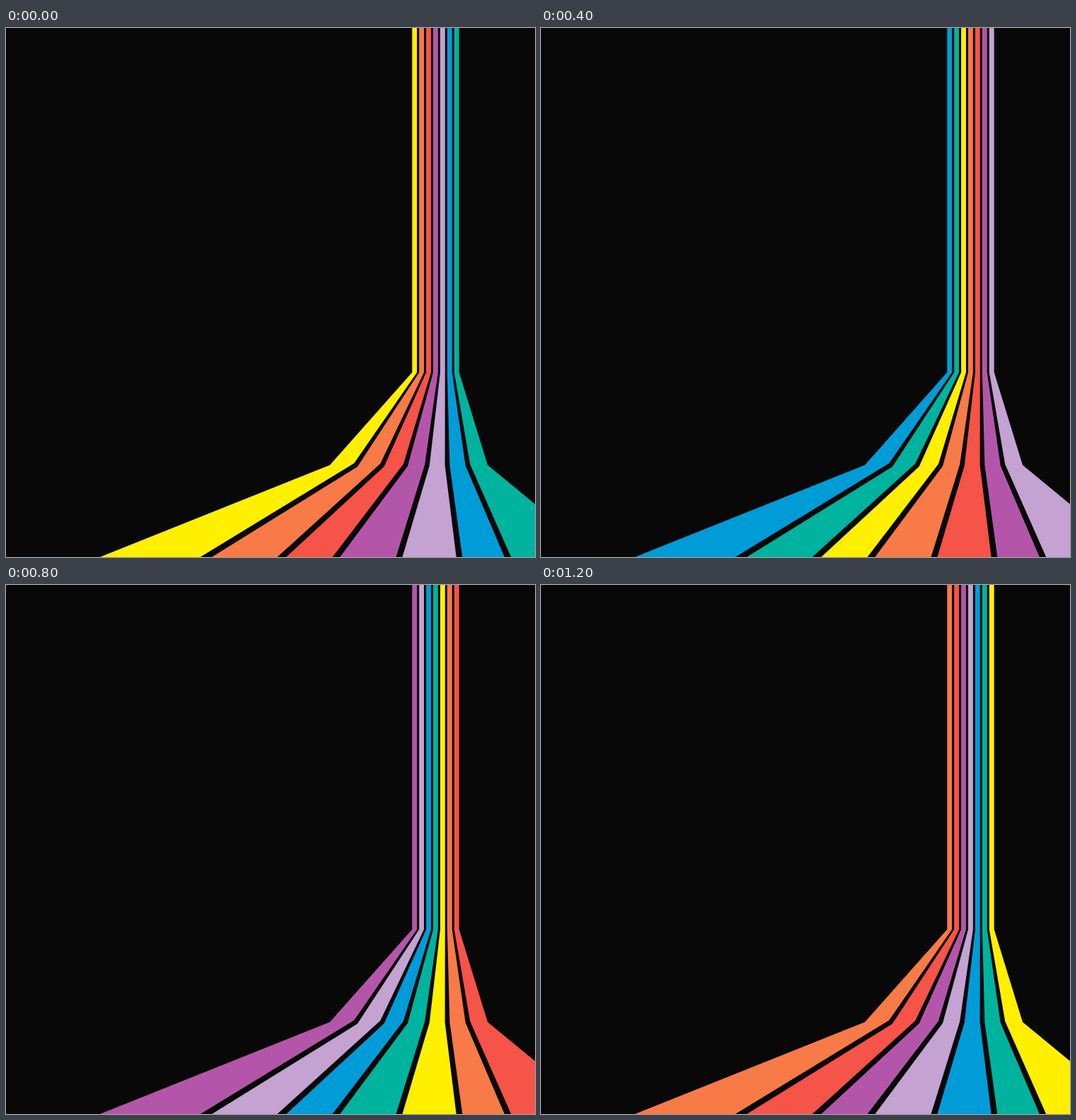
An HTML page with a canvas that plays this animation: 748x748 px, repeating every 1400 ms.

```html
<!DOCTYPE html>
<html lang="en">
<head>
<meta charset="utf-8">
<title>Rainbow stripes</title>
<style>
  html, body { margin: 0; width: 100%; height: 100%; overflow: hidden; background: #080808; }
  canvas { display: block; width: 748px; height: 748px; }
</style>
</head>
<body>
<canvas id="stage" width="748" height="748"></canvas>
<script>
const ctx = document.getElementById('stage').getContext('2d');
const SIZE = 748, STEP = 200, KNEE = 487, BEND = 618;
const BLACK = '#080808';
const COLORS = ['#fff000', '#f87a47', '#f65349', '#b356aa', '#c4a2d2', '#009cd8', '#00b39e'];
const COUNT = COLORS.length;

// Each line between stripes drops straight, then fans out: x at the bend and at the bottom.
const lines = [
  [458, 133], [494.5, 283], [532, 390], [565, 467],
  [595.5, 556], [624, 641], [653, 709.5], [681, 839]
].map(([bend, foot], i) => {
  const top = Math.min(640.7, Math.max(574.3, 572.7 + 9.93 * i));
  return [[top, 0], [top, KNEE], [bend, BEND], [foot, SIZE]];
});

function shape(left, right) {
  const path = new Path2D();
  [...left, ...[...right].reverse()].forEach(([x, y]) => path.lineTo(x, y));
  path.closePath();
  return path;
}

// Black gap along a line, widening from top to bottom.
function gap(line) {
  const [, [top], [bend], [foot]] = line;
  const upper = Math.atan2(BEND - KNEE, bend - top);
  const lower = Math.atan2(SIZE - BEND, foot - bend);
  const turn = (upper + lower) / 2;
  const offsets = [
    [1.55, 0], [1.55, 0],
    [3.4 * Math.sin(turn), -3.4 * Math.cos(turn)],
    [4.3 / Math.sin(lower), 0]
  ];
  const side = sign => line.map(([x, y], i) => [x + sign * offsets[i][0], y + sign * offsets[i][1]]);
  return shape(side(-1), side(1));
}

const stripes = COLORS.map((_, i) => shape(lines[i], lines[i + 1]));
const gaps = lines.slice(1, -1).map(gap);

function draw(shift) {
  ctx.fillStyle = BLACK;
  ctx.fillRect(0, 0, SIZE, SIZE);
  stripes.forEach((path, i) => {
    ctx.fillStyle = COLORS[(i - shift + COUNT) % COUNT];
    ctx.fill(path);
  });
  ctx.fillStyle = BLACK;
  gaps.forEach(path => ctx.fill(path));
}

const start = performance.now();
function tick() {
  draw(Math.floor((performance.now() - start) / STEP) % COUNT);
  requestAnimationFrame(tick);
}
tick();
</script>
</body>
</html>
```
